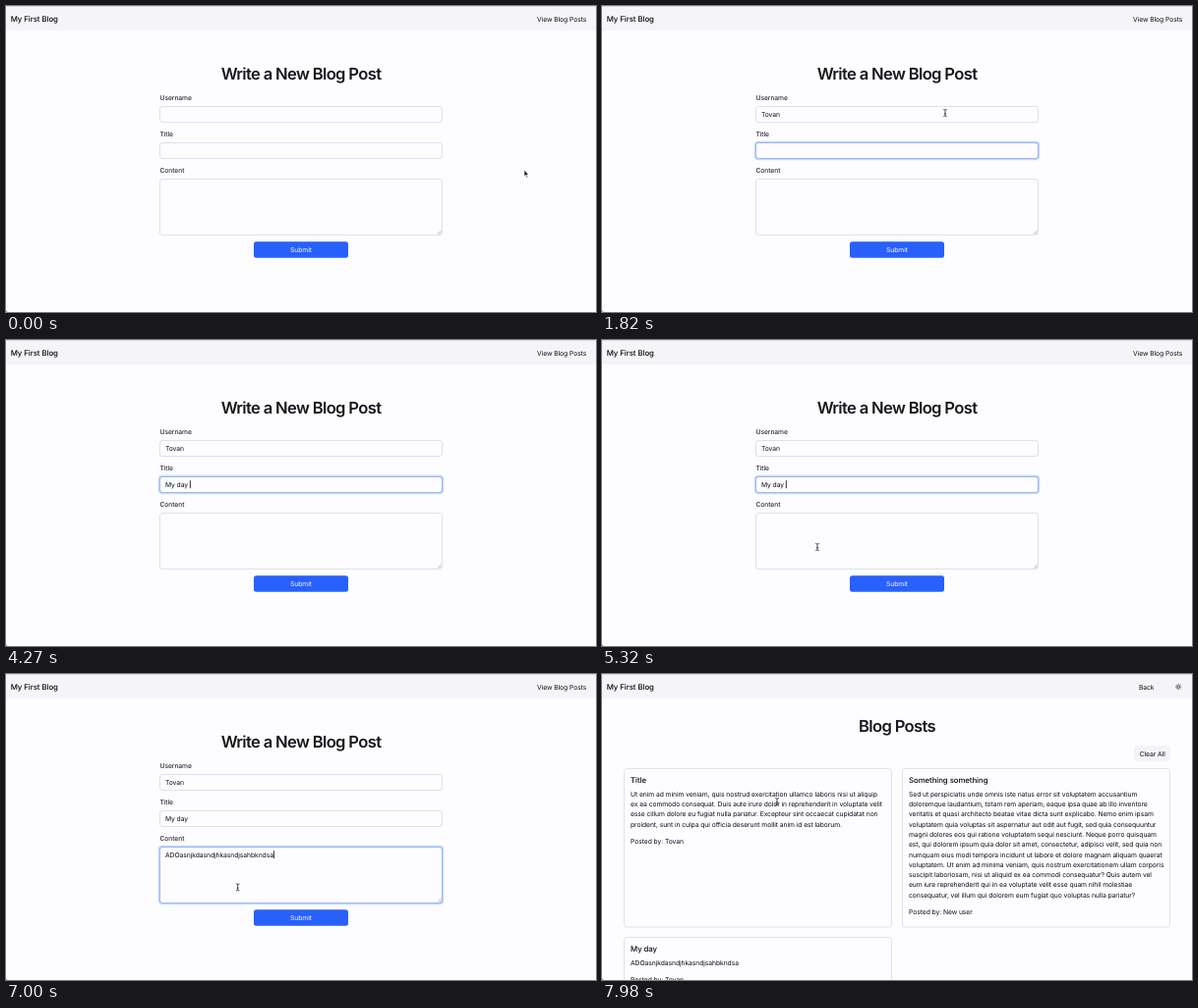
An HTML page for the animation above (8000 ms loop, 600 by 312 pixels).

```html
<!DOCTYPE html>
<html lang="en">
<head>
<meta charset="utf-8">
<title>My First Blog</title>
<style>
  html, body { margin: 0; width: 100%; height: 100%; overflow: hidden; background: #fdfcfe; }
  svg { display: block; width: 600px; height: 312px; }
  text {
    font: 6.75px Inter, Roboto, sans-serif; letter-spacing: -.01em; fill: #0c0c10;
    white-space: pre; text-rendering: geometricPrecision;
  }
  .brand, .cardTitle { font-size: 7.85px; font-weight: 500; }
  .heading { font-size: 16.6px; font-weight: 600; letter-spacing: -.04em; text-anchor: middle; fill: #18181b; }
  .box { fill: #fdfcfe; stroke: #e1e0e5; }
  .line { fill: none; stroke: #0c0c10; stroke-width: .7; }
  .pointer { fill: #000; stroke: #fff; stroke-width: .6; }
</style>
</head>
<body>
<svg id="stage" viewBox="0 0 600 312"></svg>
<script>
const LOOP = 8000, BLINK = 500, PAGE_CHANGE = 7490, PRESS = 7420;
const USER = 'Tovan', POST = 'ADOasnjkdasndjhkasndjsahbkndsa';
const stage = document.getElementById('stage');

function add(parent, tag, attrs = {}, content = '') {
  const node = document.createElementNS('http://www.w3.org/2000/svg', tag);
  for (const name in attrs) node.setAttribute(name, attrs[name]);
  node.textContent = content;
  return parent.appendChild(node);
}
const label = (parent, x, y, content, cls = '') => add(parent, 'text', { x, y, class: cls }, content);
const rect = (parent, x, y, width, height, attrs) => add(parent, 'rect', { x, y, width, height, ...attrs });
const show = (node, on) => node.setAttribute('visibility', on ? 'visible' : 'hidden');
const clamp = v => Math.min(1, Math.max(0, v));

// Shared header
rect(stage, 0, 0, 600, 25, { fill: '#f5f4f6' });
rect(stage, 0, 0, 600, 1, { fill: '#dcdbde' });
label(stage, 4.7, 15.9, 'My First Blog', 'brand');

// Form page
const form = add(stage, 'g');
label(form, 540, 15.5, 'View Blog Posts');
label(form, 300, 74.8, 'Write a New Blog Post', 'heading');

const fields = [
  { name: 'Username', top: 102.5, height: 16, value: USER, focus: 200, blur: 1180,
    keys: [840, 910, 980, 1050, 1120] },
  { name: 'Title', top: 139.5, height: 16, value: 'My day ', focus: 1180, blur: 5390,
    keys: [2800, 2870, 3010, 3150, 3290, 3500, 3920] },
  { name: 'Content', top: 176.5, height: 57, value: POST, focus: 5390, blur: PRESS,
    keys: [...POST].map((_, i) => i < 8 ? 5740 + 70 * i : 6230 + 30 * (i - 7)) },
];
for (const f of fields) {
  label(form, 156.5, f.top - 6.1, f.name);
  rect(form, 156.5, f.top, 287, f.height, { rx: 2.5, class: 'box' });
  f.ring = add(form, 'g', { fill: 'none' });
  rect(f.ring, 155.9, f.top - .6, 288.2, f.height + 1.2, { rx: 3, stroke: '#c4d9fb', 'stroke-width': 2.2 });
  rect(f.ring, 156.5, f.top, 287, f.height, { rx: 2.5, stroke: '#8fb2f2', 'stroke-width': .8 });
  f.text = label(form, 162, f.top + 10.5, '');
  f.caret = rect(form, 162, f.top + 3.7, .8, 8, { fill: '#000' });
}
add(form, 'path', { d: 'M439 232.5l3.5-3.5M441 232.5l1.5-1.5', stroke: '#8b8b90', 'stroke-width': .6 });
const spelling = add(form, 'path', {
  d: 'M162 188.6H271', stroke: '#77777c', 'stroke-width': .9, 'stroke-dasharray': '1 .9',
});
rect(form, 252, 240.2, 96, 16.6, { rx: 2.5, fill: '#2860fb' });
const hover = rect(form, 252, 240.2, 96, 16.6, { rx: 2.5, fill: '#1e4dc6' });
add(form, 'text', { x: 300, y: 250.9, 'text-anchor': 'middle', style: 'fill:#fff' }, 'Submit');

// Posts page
const posts = add(stage, 'g');
label(posts, 546, 15.5, 'Back');
const sun = add(posts, 'g', { transform: 'translate(586.2 13)', class: 'line' });
add(sun, 'circle', { r: 1.4 });
for (let a = 0; a < 360; a += 45) add(sun, 'path', { d: 'M2.3 0H3.2', transform: `rotate(${a})` });
label(posts, 300, 58.8, 'Blog Posts', 'heading');
rect(posts, 541, 73, 37, 16, { rx: 3, fill: '#f4f3f6' });
label(posts, 546.7, 83.5, 'Clear All');

function card(x, y, title, lines, author) {
  rect(posts, x + .5, y + .5, 272, 161.5, { rx: 3, class: 'box' });
  label(posts, x + 7, y + 15.3, title, 'cardTitle');
  lines.forEach((line, i) => label(posts, x + 7, y + 28.7 + 10.3 * i, line));
  label(posts, x + 7, y + 35.4 + 10.3 * lines.length, 'Posted by: ' + author);
}
card(22, 96, 'Title', [
  'Ut enim ad minim veniam, quis nostrud exercitation ullamco laboris nisi ut aliquip',
  'ex ea commodo consequat. Duis aute irure dolor in reprehenderit in voluptate velit',
  'esse cillum dolore eu fugiat nulla pariatur. Excepteur sint occaecat cupidatat non',
  'proident, sunt in culpa qui officia deserunt mollit anim id est laborum.',
], USER);
card(305, 96, 'Something something', [
  'Sed ut perspiciatis unde omnis iste natus error sit voluptatem accusantium',
  'doloremque laudantium, totam rem aperiam, eaque ipsa quae ab illo inventore',
  'veritatis et quasi architecto beatae vitae dicta sunt explicabo. Nemo enim ipsam',
  'voluptatem quia voluptas sit aspernatur aut odit aut fugit, sed quia consequuntur',
  'magni dolores eos qui ratione voluptatem sequi nesciunt. Neque porro quisquam',
  'est, qui dolorem ipsum quia dolor sit amet, consectetur, adipisci velit, sed quia non',
  'numquam eius modi tempora incidunt ut labore et dolore magnam aliquam quaerat',
  'voluptatem. Ut enim ad minima veniam, quis nostrum exercitationem ullam corporis',
  'suscipit laboriosam, nisi ut aliquid ex ea commodi consequatur? Quis autem vel',
  'eum iure reprehenderit qui in ea voluptate velit esse quam nihil molestiae',
  'consequatur, vel illum qui dolorem eum fugiat quo voluptas nulla pariatur?',
], 'New user');
card(22, 268, 'My day', [POST], USER);

// Rounded window corner
add(stage, 'path', { d: 'M0 310Q0 312 2 312H0Z', fill: '#66666a' });

// Mouse pointer shapes, each with its hot spot at 0,0
const pointer = add(stage, 'g');
const shapes = {
  arrow: add(pointer, 'path', { class: 'pointer', d: 'M0 0V6.2L1.4 5L2.4 7.3L3.4 6.8L2.4 4.7H4.3Z' }),
  beam: add(pointer, 'path', { class: 'line', d: 'M-1.8 -3.5Q0 -3.5 0 -2.5Q0 -3.5 1.8 -3.5M0 -2.5V2.5M-1.8 3.5Q0 3.5 0 2.5Q0 3.5 1.8 3.5M-1 .8H1' }),
  hand: add(pointer, 'path', { class: 'pointer', style: 'fill:#fff;stroke:#000',
    d: 'M-.7 -2.6Q0 -3.6 .6 -2.6V-.6L2.6 -.1Q3.5 .2 3.3 1.3L2.8 3.8H-.3L-2.2 1.2Q-2 .2 -.7 1Z' }),
};
const route = [
  [0, 529, 168], [280, 349, 109], [4700, 349, 109], [5250, 219, 211], [6900, 219, 211],
  [7300, 324, 251.5], [PAGE_CHANGE - 1, 324, 251.5], [PAGE_CHANGE, 360, 247], [7640, 360, 247], [7960, 178, 130],
];
const hiddenWhileTyping = [[840, 1180], [2800, 4740], [5740, 6900]];

function pointerAt(t) {
  const next = route.findIndex(stop => stop[0] > t);
  if (next < 0) return route.at(-1).slice(1);
  const [t0, x0, y0] = route[next - 1], [t1, x1, y1] = route[next];
  const p = (t - t0) / (t1 - t0);
  const e = t0 === 0 ? 1 - (1 - p) ** 3 : p * p * (3 - 2 * p);
  return [x0 + (x1 - x0) * e, y0 + (y1 - y0) * e];
}

function pointerShape(x, y, onForm) {
  if (!onForm) return (x < 285 && y < 158) || (x > 312 && y < 230) ? 'beam' : 'arrow';
  if (x > 252 && x < 348 && y > 240 && y < 257) return 'hand';
  const overField = fields.some(f => x > 156 && x < 444 && y > f.top && y < f.top + f.height);
  return overField ? 'beam' : 'arrow';
}

function draw(t) {
  const onForm = t < PAGE_CHANGE;
  form.style.display = onForm ? '' : 'none';
  posts.style.display = onForm ? 'none' : '';

  for (const f of fields) {
    const typed = f.keys.filter(k => k <= t);
    const focused = t >= f.focus && t < f.blur;
    const lastEvent = typed.length ? typed.at(-1) : f.focus;
    f.text.textContent = f.value.slice(0, typed.length);
    f.ring.setAttribute('opacity', focused ? clamp((t - f.focus) / 150) : 0);
    const caretOn = focused && Math.floor((t - lastEvent) / BLINK) % 2 === 0;
    f.caret.setAttribute('opacity', caretOn ? 1 : 0);
    if (caretOn) f.caret.setAttribute('x', 162 + (typed.length ? f.text.getComputedTextLength() : 0));
  }
  spelling.setAttribute('opacity', t >= PRESS ? 1 : 0);
  hover.setAttribute('opacity', clamp((t - 7180) / 150));

  const [x, y] = pointerAt(t);
  const current = pointerShape(x, y, onForm);
  const hidden = hiddenWhileTyping.some(([from, to]) => t >= from && t < to);
  pointer.setAttribute('transform', `translate(${x} ${y})`);
  for (const name in shapes) show(shapes[name], !hidden && name === current);
}

function tick() {
  draw(performance.now() % LOOP);
  requestAnimationFrame(tick);
}
tick();
</script>
</body>
</html>
```
